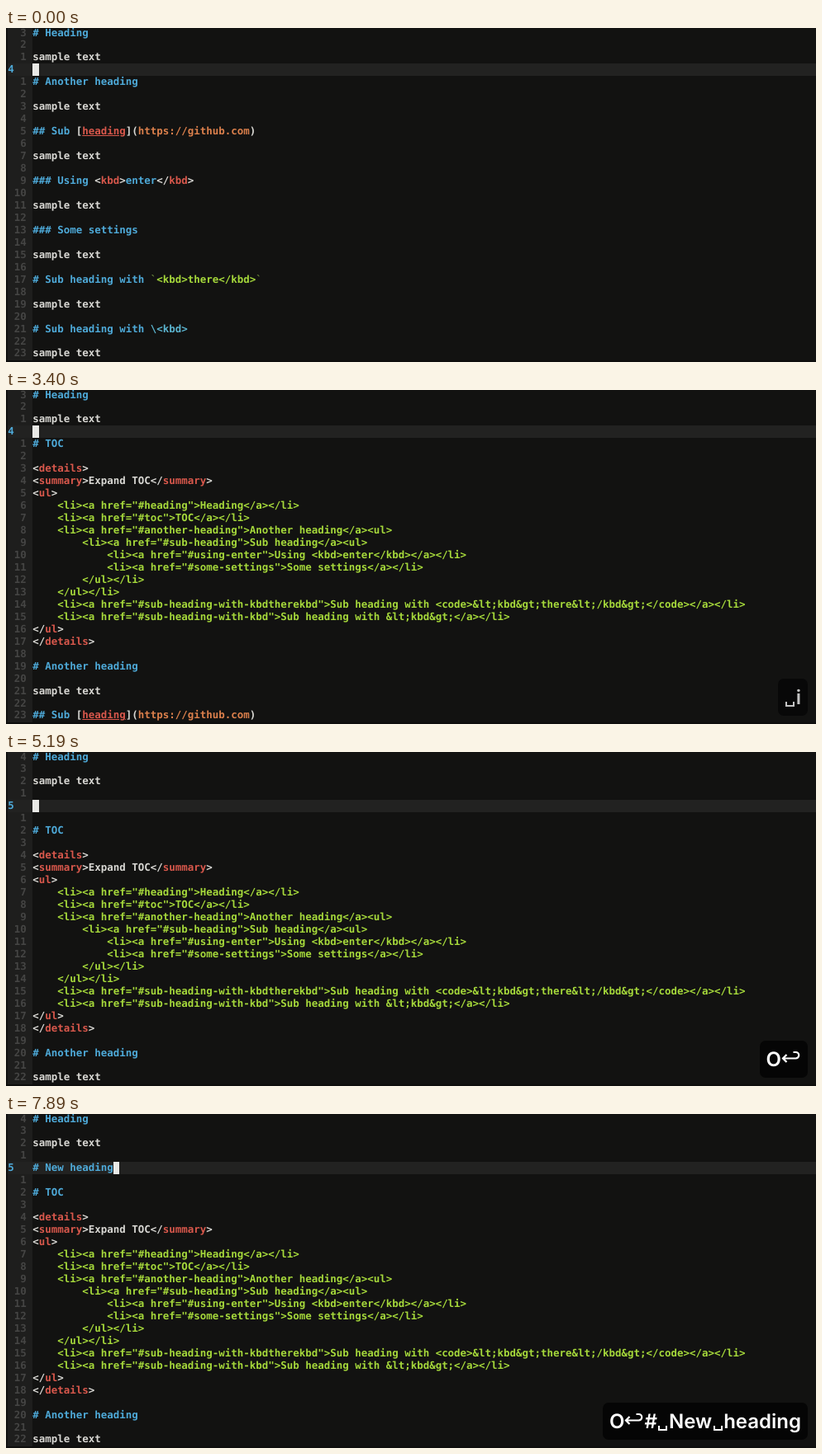
Recreate the animation shown at these times as an HTML page. Size 980 by 405 pixels, loop 8000 ms.

```html
<!DOCTYPE html>
<html lang="en">
<head>
<meta charset="utf-8">
<title>Table of contents in an editor</title>
<style>
html, body { margin: 0; width: 100%; height: 100%; overflow: hidden; background: #121211; }
#stage {
  position: relative; width: 980px; height: 405px; overflow: hidden; background: #121211;
  font: bold 12.465px/14.96px "DejaVu Sans Mono", monospace;
  text-rendering: geometricPrecision; font-variant-ligatures: none;
}
#gutter { position: absolute; left: 2px; top: 0; width: 30px; height: 403px; background: #1e1e1d; }
#line { position: absolute; left: 2px; width: 978px; height: 14.96px; background: #222221; }
#cursor { position: absolute; width: 7.5px; height: 14.96px; background: #e9e9e6; }
#rows { position: absolute; left: 2.3px; top: -1.5px; white-space: pre; }
#rows div { position: absolute; left: 0; }
#status { position: absolute; left: 0; top: 403px; width: 980px; height: 2px; background: #0e0e0d; }
#status i { position: absolute; top: 1px; height: 1px; background: #a83a35; }
#keys {
  position: absolute; right: 10px; top: 350px; height: 45px; padding: 0 8px;
  box-sizing: border-box; border-radius: 7px; background: #050505; color: #fff;
  font: 600 24px/45px Inter, "Open Sans", sans-serif; white-space: pre;
}
#keys b {
  display: inline-block; box-sizing: border-box; width: 11px; height: 6px; margin: 0 1.5px;
  border: 2px solid #fff; border-top: 0; vertical-align: -3px;
}
#keys svg { vertical-align: 1px; fill: none; stroke: #fff; stroke-width: 2.2; }
.w { color: #d9d8d4; }
.b { color: #4eaad9; }
.r { color: #d9584c; }
.u { color: #d9584c; text-decoration: underline; }
.o { color: #dc804c; }
.g { color: #a6d93b; }
.d { color: #66803a; }
.c { color: #5bb4cf; }
.n { color: #454544; }
</style>
</head>
<body>
<div id="stage">
  <div id="gutter"></div><div id="line"></div><div id="cursor"></div>
  <div id="rows"></div>
  <div id="status"><i style="left:124px;width:5px"></i><i style="left:230px;width:3px"></i></div>
  <div id="keys"></div>
</div>
<script>
const LOOP = 8000, ROW = 14.96, COL = 7.504, TOP = -1.5, ROWS = 27;
const $ = id => document.getElementById(id);

// Lines are coloured segments "class:text" joined by "|".
const tag = name => `w:<|r:${name}|w:>`;
const end = name => `w:</|r:${name}|w:>`;
const item = (depth, href, text, tail = "</a></li>") =>
  `g:${" ".repeat(depth * 4)}<li><a href="#${href}">${text}${tail}`;
const sample = "w:sample text";

const intro = ["b:# Heading", "", sample, ""];
const toc = [
  "b:# TOC", "",
  tag("details"),
  `${tag("summary")}|w:Expand TOC|${end("summary")}`,
  tag("ul"),
  item(1, "heading", "Heading"),
  item(1, "toc", "TOC"),
  item(1, "another-heading", "Another heading", "</a><ul>"),
  item(2, "sub-heading", "Sub heading", "</a><ul>"),
  item(3, "using-enter", "Using <kbd>enter</kbd>"),
  item(3, "some-settings", "Some settings"),
  "g:        </ul></li>",
  "g:    </ul></li>",
  item(1, "sub-heading-with-kbdtherekbd", "Sub heading with <code>&lt;kbd&gt;there&lt;/kbd&gt;</code>"),
  item(1, "sub-heading-with-kbd", "Sub heading with &lt;kbd&gt;"),
  end("ul"), end("details"), ""
];
const body = [
  "b:# Another heading",
  "b:## Sub |w:[|u:heading|w:](|o:https://github.com|w:)",
  `b:### Using |${tag("kbd")}|b:enter|${end("kbd")}`,
  "b:### Some settings",
  "b:# Sub heading with |d:`|g:<kbd>there</kbd>|d:`",
  "b:# Sub heading with |c:\\<kbd>"
].flatMap(head => [head, "", sample, ""]);

const docs = {
  plain: () => [...intro, ...body],
  toc: () => [...intro, ...toc, ...body],
  open: () => [...intro, "", ...toc, ...body],
  typing: text => [...intro, text && "b:" + text, "", ...toc, ...body]
};

// time, document, typed text, pressed keys (_ space, ~ return), key opacity
const steps = [
  [0, "plain", "", "", 0],
  [1300, "plain", "", "_", .4],
  [1400, "plain", "", "_", .75],
  [1500, "plain", "", "_i", 1],
  [1600, "toc", "", "_i", 1],
  [3400, "toc", "", "_i", .75],
  [3500, "toc", "", "_i", .4],
  [3600, "toc", "", "", 0],
  [3900, "open", "", "O", .4],
  [4000, "open", "", "O", .75],
  [4100, "open", "", "O", 1],
  [5090, "open", "", "O~", 1],
  [5190, "typing", "", "O~", 1],
  [5990, "typing", "", "O~#", 1],
  [6090, "typing", "#", "O~#", 1],
  [6190, "typing", "#", "O~#_", 1],
  [6290, "typing", "# ", "O~#_", 1],
  [6590, "typing", "# ", "O~#_N", 1],
  [6790, "typing", "# N", "O~#_Ne", 1],
  [6890, "typing", "# Ne", "O~#_Ne", 1],
  [6990, "typing", "# Ne", "O~#_New", 1],
  [7190, "typing", "# New", "O~#_New_", 1],
  [7290, "typing", "# New ", "O~#_New_", 1],
  [7490, "typing", "# New he", "O~#_New_he", 1],
  [7690, "typing", "# New hea", "O~#_New_headi", 1],
  [7790, "typing", "# New headi", "O~#_New_heading", 1],
  [7890, "typing", "# New heading", "O~#_New_heading", 1]
];

const arrow = '<svg width="24" height="20"><path d="M6.5 7 2 11.5l4.5 4.5M2.5 11.5h15a3.75 3.75 0 0 0 0-7.5h-3"/></svg>';

function span(cls, text) {
  const s = document.createElement("span");
  s.className = cls;
  s.textContent = text;
  return s;
}

function rowElement(line, i, current) {
  const row = document.createElement("div");
  row.style.top = i * ROW + "px";
  row.append(i === current
    ? span("b", String(i + 1).padEnd(4))
    : span("n", String(Math.abs(i - current)).padStart(3) + " "));
  for (const part of line ? line.split("|") : []) row.append(span(part[0], part.slice(2)));
  return row;
}

function draw([, doc, text, keys, opacity]) {
  const current = doc === "typing" ? 4 : 3;
  const lines = docs[doc](text).slice(0, ROWS);
  $("rows").replaceChildren(...lines.map((line, i) => rowElement(line, i, current)));
  const y = TOP + current * ROW + "px";
  $("line").style.top = $("cursor").style.top = y;
  $("cursor").style.left = 2.3 + (4 + text.length) * COL + "px";
  for (const mark of $("status").children) mark.hidden = doc !== "open";
  for (const mark of $("status").children) mark.style.display = doc === "open" ? "block" : "none";
  $("keys").innerHTML = keys.replace(/_/g, "<b></b>").replace("~", arrow);
  $("keys").style.opacity = opacity;
}

const start = performance.now();
let shown;
function tick() {
  const t = Math.max(0, performance.now() - start) % LOOP;
  const step = steps.findLast(s => s[0] <= t);
  if (step !== shown) draw(shown = step);
  requestAnimationFrame(tick);
}
tick();
</script>
</body>
</html>
```
